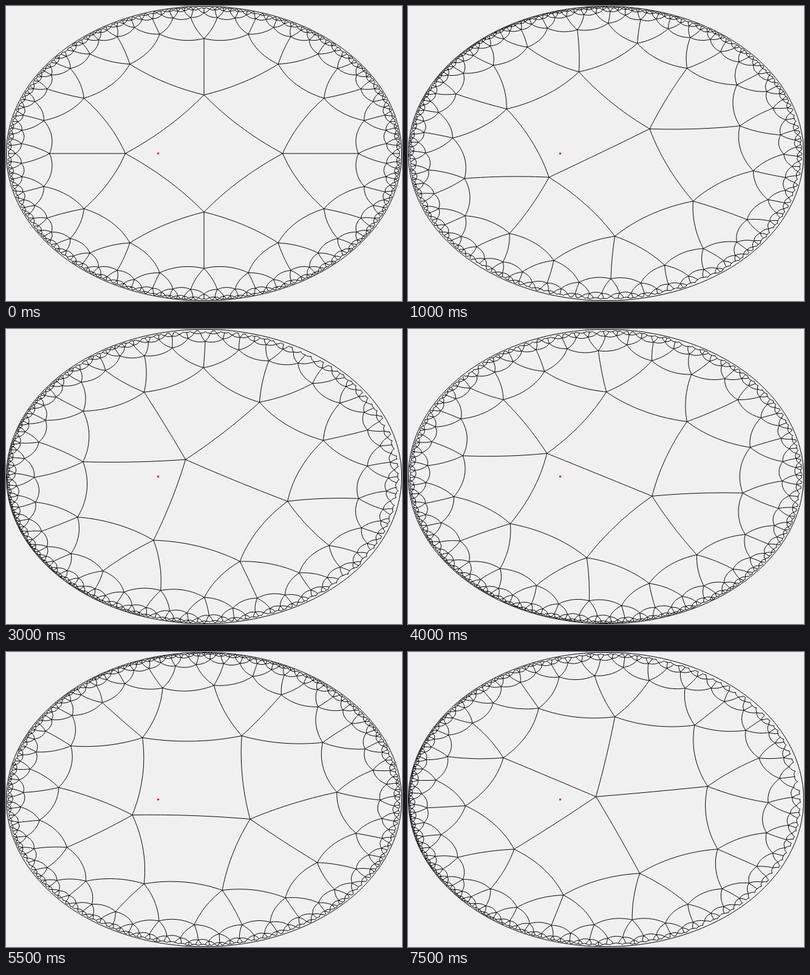
Recreate the animation shown at these times as an HTML page with a canvas. Size 652 px wide and 486 px high, loop 8 s.

```html
<!DOCTYPE html>
<html lang="en">
<head>
<meta charset="utf-8">
<title>Hyperbolic tiling</title>
<style>
html, body { margin: 0; width: 100%; height: 100%; overflow: hidden; background: #f0f0f0; }
canvas { display: block; }
</style>
</head>
<body>
<canvas id="stage" width="652" height="486"></canvas>
<script>
const W = 652, H = 486;
const CX = W / 2, CY = H / 2, RX = CX - 0.5, RY = CY - 0.5;
const STEP_MS = 500, STEPS = 16, STEP_ANGLE = -36.385 * Math.PI / 180;
const PIVOT = [-0.2313, 0];
const REACH = 0.99; // tiles centred further out are left off

const ctx = document.getElementById('stage').getContext('2d');

// Disk translation taking 0 to c
function shift([x, y], [cx, cy]) {
  const nx = x + cx, ny = y + cy;
  const dx = 1 + cx * x + cy * y, dy = cx * y - cy * x;
  const d = dx * dx + dy * dy;
  return [(nx * dx + ny * dy) / d, (ny * dx - nx * dy) / d];
}

const neg = ([x, y]) => [-x, -y];

function rotate(p, c, angle) {
  const [x, y] = shift(p, neg(c));
  const cos = Math.cos(angle), sin = Math.sin(angle);
  return shift([x * cos - y * sin, x * sin + y * cos], c);
}

const key = ([x, y]) => Math.round(x * 1e5) + ',' + Math.round(y * 1e5);

// Squares, five around each vertex, grown outward from the middle
function buildEdges() {
  const coshR = 1 / Math.tan(Math.PI / 5);
  const r = Math.sqrt((coshR - 1) / (coshR + 1));
  const tiles = [{ center: [0, 0], corners: [[r, 0], [0, r], [-r, 0], [0, -r]] }];
  const seen = new Set([key(tiles[0].center)]);
  const edges = new Map();

  for (const { corners } of tiles) {
    corners.forEach((p, i) => {
      const q = corners[(i + 1) % 4];
      edges.set(key([(p[0] + q[0]) / 2, (p[1] + q[1]) / 2]), [p, q]);
    });
    for (const v of corners) {
      for (let j = 1; j < 5; j++) {
        const turn = p => rotate(p, v, j * 2 * Math.PI / 5);
        const { center: c, corners: cs } = tiles[tiles.length - 1] && { center: null, corners };
        const fresh = cs.map(turn);
        const center = middle(fresh);
        const id = key(center);
        if (Math.hypot(...center) > REACH || seen.has(id)) continue;
        seen.add(id);
        tiles.push({ center, corners: fresh });
      }
    }
  }
  return [...edges.values()];
}

// Midpoint of the geodesic between opposite corners
function middle([p, , q]) {
  const [x, y] = shift(q, neg(p));
  const half = 1 / (1 + Math.sqrt(1 - x * x - y * y));
  return shift([x * half, y * half], p);
}

function geodesic(p, q) {
  const [wx, wy] = shift(q, neg(p));
  const n = Math.ceil(Math.hypot(q[0] - p[0], q[1] - p[1]) * RX / 5);
  for (let i = 0; i <= n; i++) {
    const t = i / n;
    const [x, y] = shift([t * wx, t * wy], p);
    ctx[i ? 'lineTo' : 'moveTo'](CX + RX * x, CY + RY * y);
  }
}

const edges = buildEdges();

function draw(step) {
  const turn = p => rotate(p, PIVOT, step * STEP_ANGLE);
  ctx.fillStyle = '#f0f0f0';
  ctx.fillRect(0, 0, W, H);

  ctx.strokeStyle = '#000';
  ctx.lineWidth = 1;
  ctx.beginPath();
  for (const [p, q] of edges) geodesic(turn(p), turn(q));
  ctx.stroke();

  ctx.beginPath();
  ctx.ellipse(CX, CY, RX, RY, 0, 0, 2 * Math.PI);
  ctx.stroke();

  ctx.fillStyle = '#f00';
  ctx.beginPath();
  ctx.arc(250.6, CY, 1.7, 0, 2 * Math.PI);
  ctx.fill();
}

let shown = -1;
function tick() {
  const step = Math.floor(performance.now() / STEP_MS) % STEPS;
  if (step !== shown) draw(shown = step);
  requestAnimationFrame(tick);
}
tick();
</script>
</body>
</html>
```
